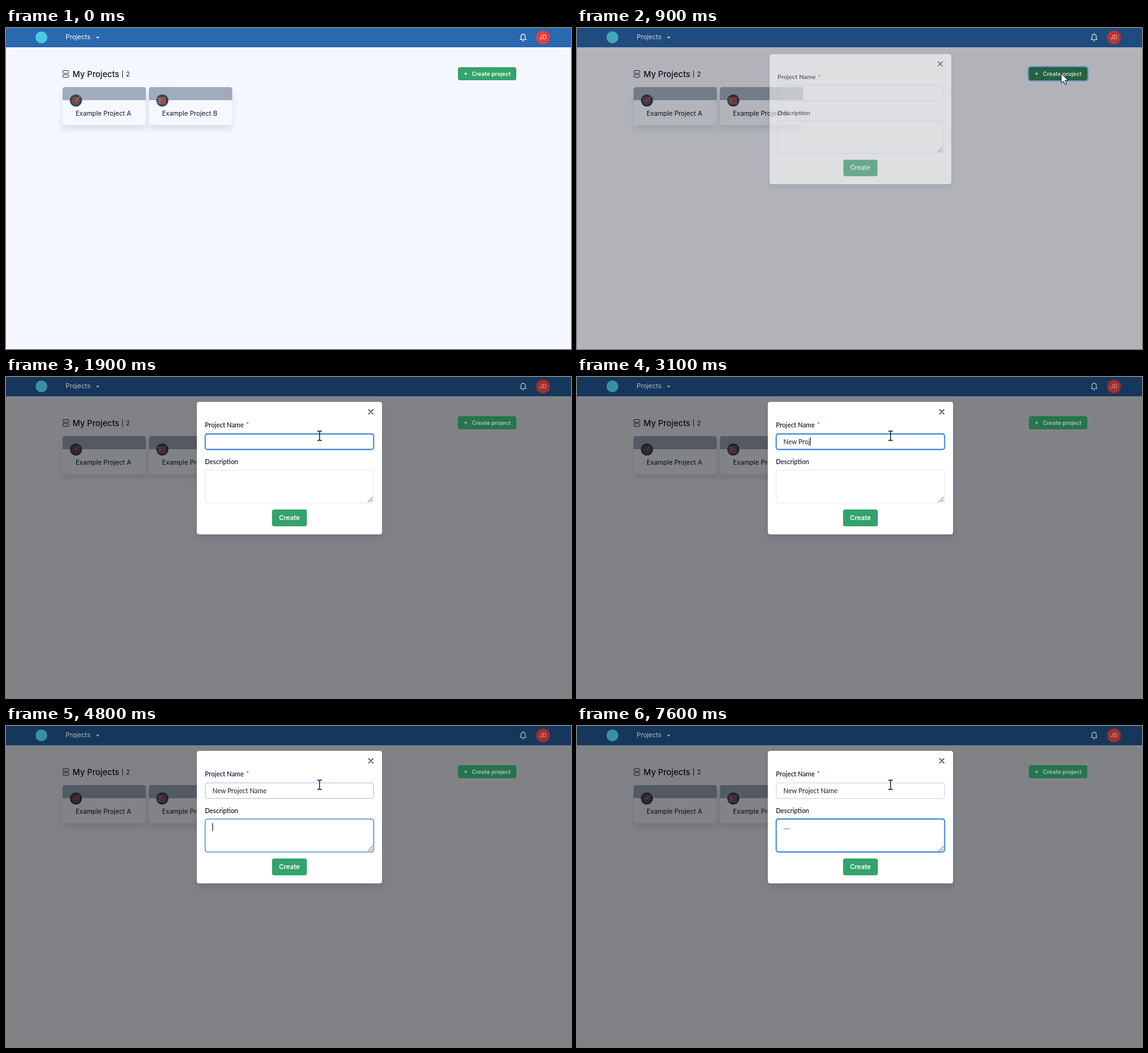
Write an HTML page that moves like this. It is 909 by 516 pixels and loops after 8000 ms.

```html
<!DOCTYPE html>
<html lang="en">
<head>
<meta charset="utf-8">
<title>Create project</title>
<style>
  html, body { margin: 0; width: 100%; height: 100%; overflow: hidden; background: #f4f7ff; }
  svg { display: block; width: 909px; height: 516px; }
  text { font-family: Inter, sans-serif; font-size: 10.4px; white-space: pre; }
  .lato { font-family: Lato, sans-serif; font-size: 10.6px; fill: #1a202c; }
  .label { font-weight: 600; font-size: 10.4px; }
  .bold { font-weight: 700; fill: #fff; }
  .card { filter: drop-shadow(0 7px 5px rgba(30, 40, 70, .11)); }
  .modal { filter: drop-shadow(0 6px 5px rgba(20, 25, 60, .12)); }
  .line { fill: none; stroke-linecap: round; stroke-linejoin: round; }
  #dialog { transform-origin: 456px 146.5px; }
</style>
</head>
<body>
<svg viewBox="0 0 909 516">
  <defs>
    <g id="card">
      <g class="card">
        <rect width="134" height="61" rx="3.5" fill="#f5f8ff"/>
      </g>
      <path d="M0 21V3.5Q0 0 3.5 0H130.500Q134 0 134 3.500V21Z" fill="#a0abbd"/>
      <circle cx="21.500" cy="21.500" r="9.800" fill="#34455a"/>
    </g>
  </defs>

  <rect width="909" height="516" fill="#f4f7ff"/>
  <rect width="909" height="31" fill="#2a69ae"/>

  <g class="line" stroke="#2d3748">
    <rect x="91.500" y="68.500" width="9.500" height="4.300" rx="1.200"/>
    <rect x="91.500" y="75" width="9.500" height="4.300" rx="1.200"/>
    <path d="M187.500 68.500V79.500"/>
  </g>
  <g fill="#171923">
    <text x="107" y="79" style="font-size:13.300px;font-weight:500">My Projects</text>
    <text x="193" y="78">2</text>
  </g>

  <use href="#card" x="91" y="95"/>
  <use href="#card" x="230" y="95"/>
  <g class="line" stroke="#d9604f">
    <circle cx="112" cy="117" r="5.300"/>
    <circle cx="112" cy="117" r="2.400"/>
    <path d="M112 117L118.500 110.500" stroke-width="1.500"/>
  </g>
  <path d="M246 112.500H257M246 115.500H257M246 118.500H257M246 121.500H257" stroke="#c9594c" stroke-width="1.800"/>
  <path d="M243 113.500H249M243 116.500H249M243 119.500H248" stroke="#8b97a8"/>
  <g fill="#171923">
    <text x="112" y="141">Example Project A</text>
    <text x="251" y="141">Example Project B</text>
  </g>

  <rect id="shade" width="909" height="516" opacity="0"/>

  <g id="accents">
    <circle cx="57" cy="15" r="9.500" fill="#4cc9df"/>
    <text x="96" y="18" fill="#fff">Projects</text>
    <path d="M144.800 14.200H150.200L147.500 17Z" fill="#fff"/>
    <path class="line" d="M827 18.500H837M828.500 18.500V14.200C828.500 8.800 835.500 8.800 835.500 14.200V18.500M832 10V9.300M831 20.700H833" stroke="#fff" stroke-width="1.200"/>
    <circle cx="864" cy="15.300" r="11" fill="#e53e3e"/>
    <text x="864" y="18.300" text-anchor="middle" fill="#fff" style="font-size:8.800px">JD</text>
    <rect id="ring" x="726" y="62" width="96" height="23" rx="4.500" fill="none" stroke="#7fb0e0" stroke-width="2"/>
    <rect id="open" x="727" y="63" width="94" height="21" rx="3.500"/>
    <path d="M736.800 73.500H742.200M739.500 70.800V76.200" stroke="#fff"/>
    <text class="bold" x="749.500" y="77" style="font-size:9.100px;font-weight:600">Create project</text>
  </g>

  <g id="dialog">
    <rect class="modal" x="307" y="40" width="298" height="213" rx="4" fill="#fff"/>
    <path class="line" d="M583.500 52.500L590.500 59.500M590.500 52.500L583.500 59.500" stroke="#1a202c" stroke-width="1.200"/>
    <text class="lato label" x="320" y="81">Project Name</text>
    <text class="lato label" x="386.500" y="81" style="fill:#e53e3e">*</text>
    <rect id="nameBox" x="320.500" y="91.500" width="271" height="25" rx="3.500" fill="#fff"/>
    <text id="name" class="lato" x="332" y="107.500"></text>
    <text class="lato label" x="320" y="140">Description</text>
    <rect id="noteBox" x="320.500" y="149.500" width="271" height="53" rx="3.500" fill="#fff"/>
    <text id="note" class="lato" x="332" y="166"></text>
    <path d="M582 201L590 193M586.500 201L590 197.500" stroke="#555"/>
    <rect id="caret" width="1" height="13" fill="#111"/>
    <rect x="428" y="213" width="56" height="27" rx="3.500" fill="#34a36b"/>
    <text class="bold" x="456" y="229.500" text-anchor="middle" style="font-weight:600">Create</text>
  </g>

  <g id="arrow">
    <path d="M0 0V15.500L3.600 12.200L6.200 18L8.700 16.900L6.200 11.300H11.200Z" fill="#fff" stroke="#111"/>
  </g>
  <g id="hand">
    <path class="line" d="M-1.800 1.600C-1.800-.5 1.500-.5 1.500 1.600V8.200C2-.3 8.200.2 8.200 9.500" stroke="none"/>
    <path d="M-1.800 1.600C-1.800-.6 1.500-.6 1.500 1.600V8C2 6.600 4.600 6.800 4.700 8.600C5.300 7.500 7.300 7.900 7.400 9.500C8.500 8.800 9.200 9.700 9.200 11V15.500C9.200 18 7.500 19 7.300 22.500H-2C-2.200 19.500-5 16.500-7.300 12.700C-8.100 11-5.800 9.900-4.400 11.400L-1.800 14Z" fill="#fff" stroke="#111" stroke-width="1.200" stroke-linejoin="round"/>
    <path d="M1.500 8V12M4.700 9V12M7.400 10V12.500" stroke="#111"/>
  </g>
  <g id="beam">
    <path class="line" d="M-3-7.500H-1L0-6.500L1-7.500H3M0-6.500V6.500M-3 7.500H-1L0 6.500L1 7.500H3" stroke="#111" stroke-width="1.300"/>
  </g>
</svg>
<script>
  const LOOP = 8000, TICK = 100;
  const $ = id => document.getElementById(id);
  const set = (id, attrs) => {
    for (const key in attrs) $(id).setAttribute(key, attrs[key]);
  };
  // Latest row whose start time has been reached.
  const at = (rows, t) => rows.filter(row => row[0] <= t).pop();

  const POINTER = [
    [0, ''], [200, 'arrow', 833, 50], [300, 'hand', 798, 66], [400, 'hand', 781, 73],
    [900, 'arrow', 779, 73], [1100, 'arrow', 745, 76], [1200, 'arrow', 640, 84],
    [1300, 'arrow', 530, 92], [1400, 'beam', 504.5, 94.5]
  ];
  const BUTTON = [
    [0, '#34a36b'], [300, '#31955f'], [400, '#2c885b'], [900, '#2a7550'], [1000, '#34a36b']
  ];
  const FADE = [[0, 0], [900, .58], [1000, .97], [1100, 1]];
  const NAME_BORDER = [
    [0, '#e2e8f0', 1], [1400, '#7fb0e0', 1.4], [1500, '#3182ce', 1.8],
    [4800, '#a3c4e6', 1], [4900, '#cbd5e0', 1]
  ];
  const NOTE_BORDER = [[0, '#e2e8f0', 1], [4800, '#4f96d6', 1.6], [4900, '#3182ce', 1.8]];
  // Time and number of characters typed so far.
  const NAME_KEYS = [
    [1400, 0], [2100, 1], [2300, 3], [2500, 4], [2700, 5], [2900, 7], [3100, 8], [3200, 9],
    [3300, 10], [3500, 11], [3600, 12], [3700, 13], [3900, 14], [4400, 15], [4500, 16]
  ];
  const NOTE_KEYS = [[4700, 0], [6700, 1], [6900, 2], [7000, 3], [7100, 4]];

  function type(id, text, keys, t) {
    const key = at(keys, t) || [0, 0];
    const shown = text.slice(0, key[1]);
    if ($(id).textContent !== shown) $(id).textContent = shown;
    return key[0];
  }

  function border(id, rows, t) {
    const [, color, width] = at(rows, t);
    set(id, { stroke: color, 'stroke-width': width });
  }

  function draw(ms) {
    const t = Math.floor(ms / TICK) * TICK;
    const fade = at(FADE, t)[1];
    set('shade', { opacity: .475 * fade });
    $('accents').style.filter = `brightness(${1 - .28 * fade})`;
    $('dialog').style.opacity = fade;
    $('dialog').style.transform = `scale(${.955 + .045 * fade})`;

    set('open', { fill: at(BUTTON, t)[1] });
    set('ring', { opacity: t >= 900 && t < 1100 ? 1 : 0 });
    border('nameBox', NAME_BORDER, t);
    border('noteBox', NOTE_BORDER, t);

    const nameTime = type('name', 'New Project Name', NAME_KEYS, t);
    const noteTime = type('note', '....', NOTE_KEYS, t);
    const inNote = t >= 4800;
    const idle = t - (inNote ? noteTime : nameTime);
    const lit = t >= 1400 && Math.floor(idle / 500) % 2 === 0;
    const field = $(inNote ? 'note' : 'name');
    const width = field.textContent ? field.getComputedTextLength() : 0;
    set('caret', { x: Math.round(332 + width), y: inNote ? 156 : 97, opacity: lit ? 1 : 0 });

    const [, kind, x, y] = at(POINTER, t);
    for (const id of ['arrow', 'hand', 'beam']) {
      const on = id === kind;
      set(id, { opacity: on ? 1 : 0, transform: on ? `translate(${x} ${y})` : '' });
    }
  }

  const start = performance.now();
  function loop() {
    draw((performance.now() - start) % LOOP);
    requestAnimationFrame(loop);
  }
  loop();
</script>
</body>
</html>
```
